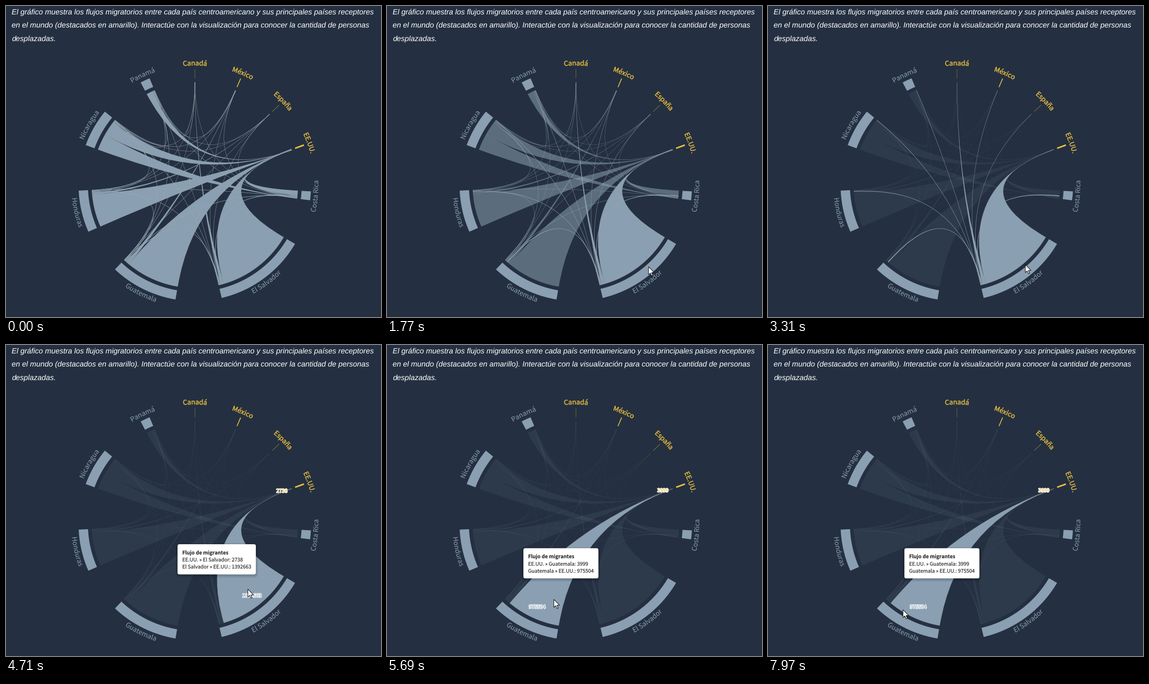
A matplotlib script that plays this animation: 800x665 px, repeating every 8 s.

```python
import matplotlib.pyplot as plt
import numpy as np
from matplotlib.animation import FuncAnimation
from matplotlib.patches import FancyBboxPatch, PathPatch, Polygon
from matplotlib.path import Path
from matplotlib.patheffects import withStroke
from matplotlib.textpath import TextPath

W, H, LOOP, STEP = 800, 665, 8000, 40
PT = 0.72  # points per pixel at 100 dpi
EM = 0.895  # brings the CJK font's Latin letters to their nominal size
BG, BLUE, EDGE, YELLOW = "#243041", "#8a9fb1", "#a3afb4", "#e9bd3f"
CX, CY = 402.8, 383
R_OUT, R_IN, R_CHORD = 248, 228, 220
PAD, DIM, FADE = 0.4, 0.09, 250

plt.rcParams.update({"font.family": "Noto Sans CJK JP", "text.hinting": "none"})
fig = plt.figure(figsize=(8, 6.65), dpi=100, facecolor=BG)
ax = fig.add_axes([0, 0, 1, 1])
ax.set(xlim=(0, W), ylim=(H, 0))
ax.axis("off")

# thousands of people leaving each country
TOTALS = {"Canadá": 3.2, "México": 13.5, "España": 4, "EE.UU.": 25,
          "Costa Rica": 143, "El Salvador": 1488, "Guatemala": 1090,
          "Honduras": 676, "Nicaragua": 616, "Panamá": 156}
NAMES = list(TOTALS)
N = len(NAMES)
CA, MX, ES, US, CR, SV, GT, HN, NI, PA = range(N)
MAIN = {(SV, US): 1392.663, (SV, CA): 50.756, (GT, US): 975.504, (GT, MX): 53,
        (HN, US): 590, (HN, ES): 32, (NI, CR): 296, (NI, US): 260,
        (PA, US): 105, (CR, US): 88}


def flow_row(i):
    """Main flows first; the rest fades with distance around the ring."""
    row = np.array([MAIN.get((i, j), 0.0) for j in range(N)])
    j = np.arange(N)
    gap = np.minimum(abs(j - i), N - abs(j - i))
    linked = (j != i) & (np.maximum(i, j) >= CR) & (row == 0)
    share = np.where(linked, 0.65 ** gap, 0)
    return row + (TOTALS[NAMES[i]] - row.sum()) * share / share.sum()


def polar(r, a):
    """Clockwise angle from the top to stage coordinates."""
    return np.column_stack([CX + r * np.sin(a), CY - r * np.cos(a)])


def arc(r, a0, a1):
    return polar(r, np.linspace(a0, a1, 2 + int(abs(a1 - a0) * 50)))


def layout(flows):
    """Angles of every group and of its parts, largest part first."""
    k = (2 * np.pi - PAD * N) / flows.sum()
    groups, parts, a = [], {}, 0
    for i, row in enumerate(flows):
        start = a
        for j in np.argsort(-row, kind="stable"):
            parts[i, j] = (a, a + row[j] * k)
            a += row[j] * k
        groups.append((start, a))
        a += PAD
    return groups, parts


def ribbon(src, dst):
    p, q = arc(R_CHORD, *src), arc(R_CHORD, *dst)
    mid = [(CX, CY)]
    verts = np.vstack([p, mid, q, mid, p[:1]])
    codes = ([Path.MOVETO] + [Path.LINETO] * (len(p) - 1) + [Path.CURVE3] * 2
             + [Path.LINETO] * (len(q) - 1) + [Path.CURVE3] * 2)
    return Path(verts, codes)


def curved_label(s, angle, color, weight):
    flip = np.pi / 2 < angle < 1.5 * np.pi
    base, sign = (263.5, -1) if flip else (256, 1)
    path = TextPath((0, 0), s, size=16 * EM)
    box = path.get_extents()
    x, y = path.vertices.T
    a = angle + sign * (x - (box.x0 + box.x1) / 2) / base
    ax.add_patch(PathPatch(Path(polar(base + sign * y, a), path.codes),
                           fc=color, ec=color, lw=weight * PT, zorder=3))


# what the pointer highlights from each time on; None means everything
HOVERS = [
    (1655, {(min(i, SV), max(i, SV)) for i in range(N) if i != SV}),
    (3400, {(US, SV)}),
    (5180, {(CA, SV)}),
    (5320, None),
    (5440, {(US, GT)}),
]


def ease(u):
    u = np.clip(u, 0, 1)
    return 4 * u ** 3 if u < 0.5 else 1 - 4 * (1 - u) ** 3


def follow(t, value, goal):
    """Ease a value to its goal for each highlight, from wherever it stands."""
    ends = [start for start, _ in HOVERS[1:]] + [LOOP]
    for (start, hot), end in zip(HOVERS, ends):
        value += (goal(hot) - value) * ease((min(t, end) - start) / FADE)
    return value


def chord_alpha(t, pair):
    return follow(t, 1, lambda hot: 1 if hot is None or pair in hot else DIM)


def count_alpha(t, pair):
    return follow(t, 0, lambda hot: float(hot == {pair}))


def hovered(t):
    return next((hot for start, hot in reversed(HOVERS) if t >= start), None)


groups, parts = layout(np.array([flow_row(i) for i in range(N)]))
chords = {}
for i in range(N):
    for j in range(max(i + 1, CR), N):
        chords[i, j] = ax.add_patch(PathPatch(
            ribbon(parts[i, j], parts[j, i]),
            fc=BLUE, ec=EDGE, lw=0.2 * PT, zorder=1))

for i, (a0, a1) in enumerate(groups):
    color = YELLOW if i < CR else BLUE
    ring = np.vstack([arc(R_OUT, a0, a1), arc(R_IN, a1, a0)])
    ax.add_patch(Polygon(ring, fc=color, ec="none", zorder=2))
    curved_label(NAMES[i], (a0 + a1) / 2, color, 0.45 if i < CR else 0)

INTRO = [
    "El gráfico muestra los flujos migratorios entre cada país centroamericano"
    " y sus principales países receptores",
    "en el mundo (destacados en amarillo). Interactúe con la visualización"
    " para conocer la cantidad de personas",
    "desplazadas.",
]
for n, line in enumerate(INTRO):
    ax.text(12, 19 + 28 * n, line, color="white", family="Liberation Sans",
            style="italic", size=16 * PT)


def count(x, y, value, color):
    return ax.text(x, y + 4, str(value), color=color, size=12 * EM * PT,
                   ha="center", zorder=4,
                   path_effects=[withStroke(linewidth=2.2 * PT, foreground="white")])


def pair_counts(there, back):
    return [count(*there, YELLOW), count(*back, BLUE)]


counts = {
    (US, SV): pair_counts((588.5, 311.5, 2738), (524.5, 535.5, 1392663)),
    (CA, SV): pair_counts((403, 181.5, 214), (456.5, 570.5, 50756)),
    (US, GT): pair_counts((588.5, 310.5, 3999), (320.5, 559.5, 975504)),
}


def tooltip(x, y, w, a, b, there, back):
    h = 64.5

    def box(grow, dy, **style):
        return ax.add_patch(FancyBboxPatch(
            (x - grow, y - grow + dy), w + 2 * grow, h + 2 * grow, lw=0, zorder=5,
            boxstyle=f"round,pad=0,rounding_size={4 + grow}", **style))

    items = [box(g, 2, fc="black", alpha=0.06) for g in (5, 3, 1)]
    items.append(box(0, 0, fc="white"))
    lines = ["Flujo de migrantes", f"{NAMES[a]} » {NAMES[b]}: {there}",
             f"{NAMES[b]} » {NAMES[a]}: {back}"]
    for n, line in enumerate(lines):
        items.append(ax.text(x + 10, y + 22 + 15 * n, line, color="#333333",
                             size=12 * EM * PT, zorder=6,
                             weight="normal" if n else "bold"))
    return items


tips = {
    (US, SV): tooltip(366, 426, 167, US, SV, 2738, 1392663),
    (US, GT): tooltip(291, 434.5, 160, US, GT, 3999, 975504),
}

ARROW = np.array([(0, 0), (0, 17), (3.9, 13.4), (6.6, 19.5), (9.2, 18.4),
                  (6.5, 12.4), (12, 12.4)])
cursor = ax.add_patch(Polygon(ARROW, fc="white", ec="black", lw=PT, zorder=7))
ENTRY = np.array([681.0, 655.0])
# pointer strokes: start, end, where to
MOVES = [(560, 1260, (574, 565)), (1470, 1770, (559, 558)),
         (1770, 1870, (549, 553)), (3310, 3640, (516, 522)),
         (4710, 5390, (377, 541)), (5390, 5690, (356, 544)),
         (6480, 6880, (338, 543)), (7630, 7970, (288, 566))]


def pointer(t):
    pos = ENTRY
    for start, end, goal in MOVES:
        pos = pos + (goal - pos) * np.clip((t - start) / (end - start), 0, 1)
    return pos


def update(n):
    t = (n + 0.5) * STEP
    for pair, patch in chords.items():
        patch.set_alpha(chord_alpha(t, pair))
    for pair, labels in counts.items():
        alpha = count_alpha(t, pair)
        for label in labels:
            label.set_alpha(alpha)
            label.set_visible(alpha > 0.005)
    hot = hovered(t)
    for pair, items in tips.items():
        for item in items:
            item.set_visible(hot == {pair})
    cursor.set_visible(t >= MOVES[0][0])
    cursor.set_xy(ARROW + pointer(t))
    return []


anim = FuncAnimation(fig, update, frames=LOOP // STEP, interval=STEP,
                     repeat=True, repeat_delay=0, blit=False)
plt.show()
```
